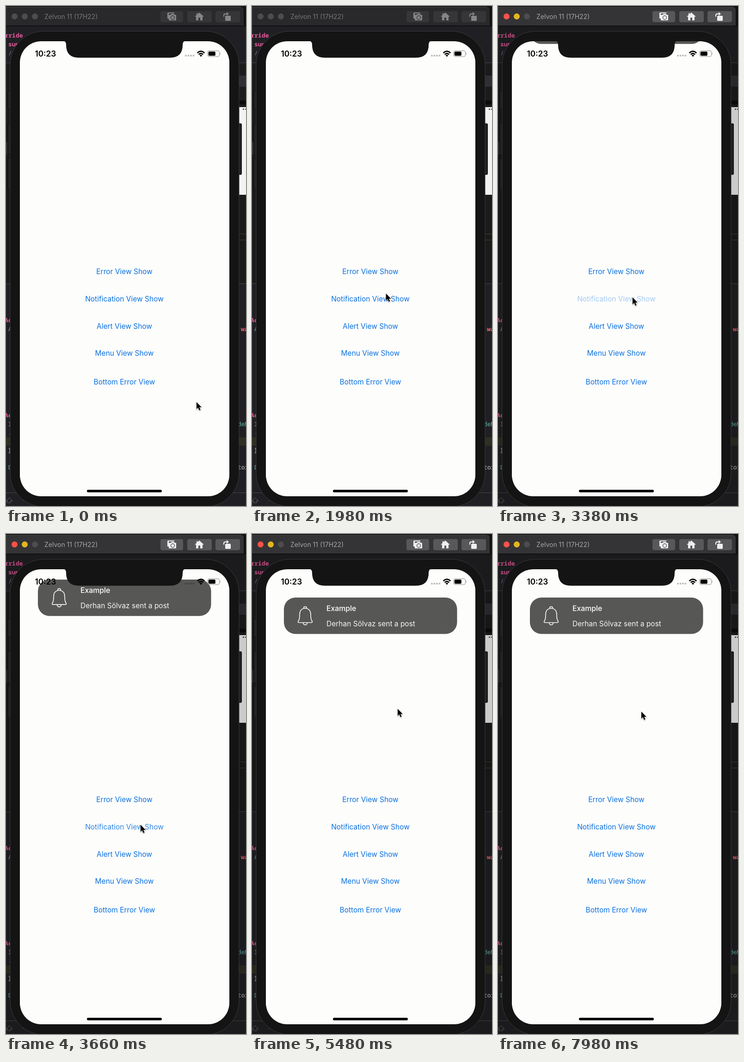
Write an HTML page that moves like this. It is 519 px wide and 1078 px high and loops after 8000 ms.

```html
<!DOCTYPE html>
<html lang="en">
<head>
<meta charset="utf-8">
<title>Notification demo</title>
<style>
html, body { margin: 0; width: 100%; height: 100%; overflow: hidden; background: #1d1d20; }
svg { display: block; width: 519px; height: 1078px; font-family: Inter, Roboto, sans-serif; }
.code { font: 13px "Noto Sans Mono", "DejaVu Sans Mono", monospace; }
.code .key { fill: #e8599a; font-weight: 700; }
.code .type { fill: #62b0a6; }
.window { --light: #4d4d4f; --red: #4d4d4f; --amber: #4d4d4f; --key: #363638; --icon: #858587; --title: #77777a; --bar: #29292b; }
.window.active { --red: #ff5148; --amber: #e5b424; --key: #58585a; --icon: #efeff0; --title: #a5a5a7; --bar: #343436; }
#buttons { font-size: 15.5px; text-anchor: middle; fill: #0a70df; }
</style>
</head>
<body>
<svg viewBox="0 0 519 1078">
  <defs>
    <clipPath id="screen"><rect x="30" y="76" width="453" height="981" rx="46"/></clipPath>
  </defs>

  <!-- editor behind the simulator -->
  <g class="code">
    <rect width="519" height="1078" fill="#202024"/>
    <rect y="122" width="519" height="477" fill="#1b1b1c"/>
    <path d="M0 122.5H519M0 598.5H519M0 1049.5H519" stroke="#47474b"/>
    <path d="M500 491.5H519M500 504.5H519" stroke="#40402f"/>
    <rect x="500" y="150" width="19" height="24" fill="#303034"/>
    <rect x="500" y="204" width="19" height="8" fill="#0c0c0d"/>
    <rect x="500" y="218" width="19" height="189" fill="#f2f2f2"/>
    <path d="M512 222.5h3m2 0h2" stroke="#222" stroke-width="2"/>
    <rect y="293" width="10" height="27" fill="#333335"/>
    <rect y="930" width="519" height="18" fill="#302f23"/>
    <g class="key">
      <text x="36.5" y="68" text-anchor="end">override</text>
      <text x="5" y="87">super</text>
      <text x="-3" y="682">Action</text>
      <text x="-3" y="887">Action</text>
      <text x="5" y="906">I</text>
    </g>
    <text x="5" y="106" fill="#77849b">//</text>
    <g class="type">
      <text x="5" y="701">A</text><text x="5" y="999">D</text>
      <text x="501" y="906">deMode</text>
    </g>
    <g fill="#cfcfd2">
      <text x="5" y="924">.</text><text x="4" y="962">]</text><text x="501" y="999">tor</text>
    </g>
    <text x="508" y="701" fill="#ed5f68" font-weight="700">was</text>
    <path d="M0 1067l7-7 7 7h-4v4H3v-4zM37 1066h8" fill="none" stroke="#626266"/>
  </g>
  <rect id="shade" y="43" width="519" height="1035" fill="#000"/>

  <!-- title bar -->
  <g class="window" id="window">
    <rect width="519" height="44" fill="#111112"/>
    <path d="M0 2H508q6 0 6 6V42H0z" style="fill:var(--bar)"/>
    <path d="M0 2.5H508" stroke="#4a4a4c"/>
    <circle cx="18.5" cy="22.5" r="6.5" style="fill:var(--red)"/>
    <circle cx="40.5" cy="22.5" r="6.5" style="fill:var(--amber)"/>
    <circle cx="62.5" cy="22.5" r="6.5" style="fill:var(--light)"/>
    <text x="83" y="28" font-size="14" style="fill:var(--title)">Zelvon 11 (17H22)</text>
    <g style="fill:var(--key)">
      <rect x="334" y="11" width="49" height="24" rx="4"/>
      <rect x="392" y="11" width="53" height="24" rx="4"/>
      <rect x="453" y="11" width="53" height="24" rx="4"/>
    </g>
    <g style="fill:var(--icon)">
      <path d="M349 27V16q0-2 2-2h13v2h-12v11z"/>
      <path d="M352 20q0-1 1-1h3l2-2h5l2 2h2q1 0 1 1v10q0 1-1 1h-14q-1 0-1-1z"/>
      <path d="M418 14l10 9h-3v8h-5v-6h-4v6h-5v-8h-3l4-3.500v-4h2.500v2z"/>
      <rect x="474" y="21" width="12" height="11" rx="1.500"/>
      <path d="M470 23v-3q0-4 4-4h3v-3l5 4-5 4v-3h-2q-3 0-3 3v2z"/>
    </g>
    <circle cx="360.500" cy="25" r="4" fill="none" stroke-width="1.400" style="stroke:var(--key)"/>
  </g>

  <!-- handset -->
  <g fill="#202021" stroke="#0b0b0b">
    <rect x="3.500" y="183.500" width="9" height="38" rx="2"/>
    <rect x="3.500" y="253.500" width="9" height="67" rx="2"/>
    <rect x="3.500" y="328.500" width="9" height="67" rx="2"/>
    <rect x="500.500" y="253.500" width="9" height="110" rx="2"/>
  </g>
  <rect x="9" y="54.500" width="495" height="1025" rx="72" fill="#141414" stroke="#3b3b3c"/>
  <g clip-path="url(#screen)">
    <rect x="30" y="76" width="453" height="981" fill="#fdfdfc"/>
    <g id="buttons">
      <text x="256" y="578">Error View Show</text>
      <text id="pressed" x="256" y="637">Notification View Show</text>
      <text x="256" y="696">Alert View Show</text>
      <text x="256" y="754">Menu View Show</text>
      <text x="256" y="816">Bottom Error View</text>
    </g>
    <g id="banner">
      <rect x="69" y="137" width="374.500" height="78.500" rx="25" fill="#575755"/>
      <g fill="none" stroke="#f4f4f2" stroke-width="1.700" stroke-linejoin="round">
        <path d="M112 160.500q-1-4 3-4t3 4M112 160.500C105 162 103 168 103 174c0 9-1 11-3 14-1 2 0 3 2 3h26c2 0 3-1 2-3-2-3-3-5-3-14 0-6-2-12-9-13.500q-3-.8-6 0z"/>
        <path d="M110.500 191.500q1 4.500 4.500 4.500t4.500-4.500"/>
      </g>
      <text x="161" y="166" font-size="15.800" font-weight="500" fill="#fff">Example</text>
      <text x="161" y="199" font-size="15.500" fill="#f6f6f4">Derhan Sölvaz sent a post</text>
    </g>
    <path d="M122 75q8 0 8 9q0 27.500 28 27.500H354q28 0 28-27.500q0-9 8-9z" fill="#141414"/>
    <text x="62.500" y="109" font-size="17.200" font-weight="600">10:23</text>
    <path d="M389 107h0m5.500 0h0m5.500 0h0m5.500 0h0" stroke="#000" stroke-opacity=".27" stroke-width="4" stroke-linecap="round"/>
    <g fill="none" stroke="#000" stroke-width="2.600">
      <path d="M413.700 101.200q7.800-7 15.600 0M416.700 104.500q4.800-4.200 9.600 0"/>
    </g>
    <path d="M418.500 106.300q3-2 6 0l-3 3.200z"/>
    <rect x="436" y="96.500" width="25.500" height="12.500" rx="3.500" fill="none" stroke="#888"/>
    <rect x="437.800" y="98.300" width="15" height="9" rx="2"/>
    <path d="M463 100.500q2 2.200 0 4.500z" fill="#888"/>
    <rect x="175" y="1043" width="162" height="5.500" rx="2.700"/>
  </g>

  <path id="cursor" d="M0 0V15L3.400 11.800 6 17.700 8.600 16.600 6.100 10.900H10.800Z" stroke="#fff" stroke-width="1.200" paint-order="stroke" style="filter:drop-shadow(0 1px 1px #0006)"/>
</svg>
<script>
const LOOP = 8000, PRESS = 2600, RELEASE = 3300;
const [shade, titleBar, pressed, banner, cursor] =
  ["shade", "window", "pressed", "banner", "cursor"].map(id => document.getElementById(id));

// time, x, y of the pointer tip
const path = [
  [100, 412, 854], [860, 289, 614], [1700, 289, 614], [2350, 291, 629],
  [3300, 291, 629], [3500, 291, 627], [3700, 291, 627], [4160, 315, 377],
  [7300, 315, 377], [7900, 310, 383]
];

const clamp = v => Math.min(1, Math.max(0, v));
const ease = v => v * v * (3 - 2 * v);
const progress = (t, start, length) => clamp((t - start) / length);

function pointer(t) {
  let [, x, y] = path[0];
  for (let i = 1; i < path.length; i++) {
    const [start, x0, y0] = path[i - 1], [end, x1, y1] = path[i];
    const k = ease(progress(t, start, end - start));
    x += (x1 - x0) * k;
    y += (y1 - y0) * k;
  }
  return [x, y];
}

function draw(now) {
  const t = now % LOOP, active = t >= PRESS;
  titleBar.classList.toggle("active", active);
  shade.setAttribute("opacity", active ? 0.16 : 0);
  pressed.setAttribute("opacity", active ? 0.22 + 0.78 * progress(t, RELEASE, 450) : 1);
  const slide = ease(progress(t, RELEASE, 550));
  banner.setAttribute("transform", `translate(0 ${-142 * (1 - slide)})`);
  cursor.setAttribute("transform", `translate(${pointer(t)})`);
  requestAnimationFrame(draw);
}
requestAnimationFrame(draw);
</script>
</body>
</html>
```
